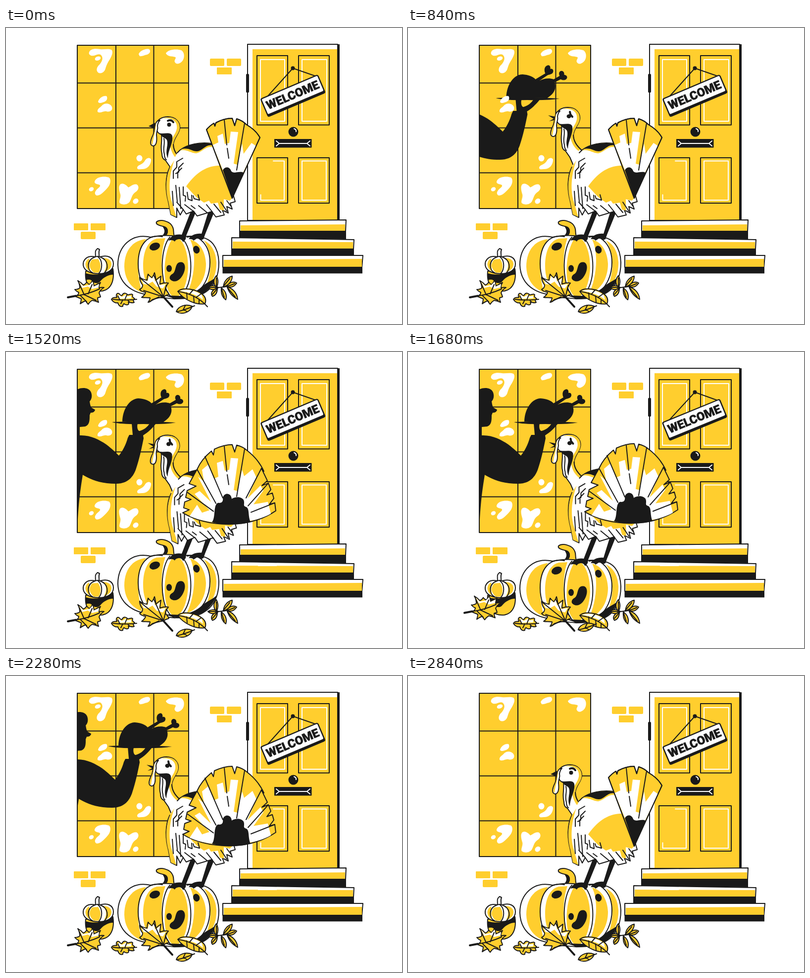
Write an HTML page that moves like this. It is 800x600 px and loops after 2880 ms.

```html
<!DOCTYPE html>
<html lang="en">
<head>
<meta charset="utf-8">
<title>Turkey at the door</title>
<style>
  html, body { margin: 0; width: 100%; height: 100%; overflow: hidden; background: #fff; }
  svg { display: block; width: 100vw; height: 100vh; }
  .k { fill: #1a1a1a; stroke: none; }
  .y { fill: #ffce2e; stroke: none; }
  .w { fill: #fff; stroke: none; }
  .yo { fill: #ffce2e; }
  .wo { fill: #fff; }
  .shine { stroke: #fff; }
  text { font: 900 24px Roboto, Inter, sans-serif; text-anchor: middle; fill: #1a1a1a; stroke-width: .6; }
</style>
</head>
<body>
<svg viewBox="0 0 800 600" fill="none" stroke="#1a1a1a" stroke-width="2" stroke-linejoin="round" stroke-linecap="round">
  <clipPath id="pane"><path d="M144 35H369V366H144Z"/></clipPath>

  <!-- window -->
  <path class="y" d="M144 35H369V366H144Z"/>
  <path d="M222 35V366M298.500 35V366M144 111.500H369M144 202.500H369M144 293.500H369"/>
  <g clip-path="url(#pane)">
    <g id="person" class="k">
      <path d="M130 75H146C152 72 168 71 172 82C175 91 172 97 169 100C170 107 171 111 173 113L180 117C179 122 175 123 171 123L169 128C169 138 169 148 160 151L149 152V169C170 168 189 178 202 187C215 197 222 204 228 210C236 200 242 188 246 174L249 168H256L254 145H266C264 152 266 160 270 160C278 158 286 152 290 145H303C296 154 287 163 277 169L278 175C274 195 270 215 262 239C255 257 243 267 222 267C190 267 170 258 155 249C152 270 146 300 144 366H130Z"/>
      <path d="M214 142Q278 139 343 143Q320 147 278 146Q230 147 214 142Z"/>
      <path d="M235 141C236 112 252 94 268 94C281 95 290 99 294 104L314 92C311 86 312 78 318 76C323 74 325 79 324 83C330 81 332 88 328 92C324 95 321 94 318 96L302 107C311 102 322 101 331 104L343 97C340 91 343 87 347 87C351 87 353 92 352 95C358 95 360 101 356 104C352 107 347 105 345 104L333 110C336 118 335 130 322 139L318 142Z"/>
    </g>
  </g>
  <g class="w">
    <path d="M168 49C170 43 178 41 190 43C198 44 206 41 213 44C217 48 214 56 210 63C204 72 203 76 201 82C199 90 192 93 187 91C181 87 183 79 189 74C194 68 198 60 191 54C185 51 179 58 172 56C168 54 167 52 168 49Z"/>
    <path d="M268 53C270 47 281 41 289 43C293 46 291 52 285 54C279 55 275 58 270 57Z"/>
    <path d="M323 51C328 43 345 42 354 45C361 49 361 60 357 66C352 73 344 75 341 69C339 65 345 61 342 59C338 57 326 59 323 51Z"/>
    <path d="M186 150C187 143 196 136 203 138C206 142 204 148 198 150C194 151 189 154 186 150Z"/>
    <path d="M185 170C184 163 190 162 194 157C199 151 211 152 214 160C216 167 210 171 203 169C197 167 191 174 185 170Z"/>
    <path d="M265 283C266 277 275 278 280 270C284 262 292 262 293 267C293 276 287 286 276 286C270 286 265 288 265 283Z"/>
    <path d="M180 309C184 301 200 300 208 303C213 307 211 318 205 324C199 331 189 342 182 339C177 335 181 329 186 325C191 321 192 318 186 317C181 316 177 314 180 309Z"/>
    <path d="M230 318C235 312 243 318 247 323C251 322 257 315 264 317C270 321 268 329 261 333C254 338 254 345 250 352C245 359 235 359 230 355C227 351 233 344 231 337C229 330 227 323 230 318Z"/>
    <ellipse cx="185.500" cy="62" rx="6" ry="4" transform="rotate(-20 185 62)"/>
    <ellipse cx="269.500" cy="264" rx="6" ry="6.500"/>
    <ellipse cx="172.500" cy="327" rx="5" ry="4" transform="rotate(-30 172 327)"/>
    <ellipse cx="262" cy="351" rx="6" ry="5" transform="rotate(-40 262 351)"/>
  </g>
  <path d="M144 35H369V366H144Z"/>

  <!-- bricks -->
  <g class="y">
    <rect x="412" y="62" width="29" height="15" rx="2"/><rect x="446" y="62" width="29" height="15" rx="2"/><rect x="426" y="80" width="30" height="14" rx="1"/>
    <rect x="137" y="396" width="29" height="14" rx="1"/><rect x="171" y="396" width="30" height="14" rx="1"/><rect x="151" y="413" width="30" height="15" rx="2"/>
  </g>

  <!-- door -->
  <path class="k" d="M668 33H674V390H668Z"/>
  <path class="wo" d="M488 33H670V390H488Z"/>
  <path class="y" d="M498 43H669V389H498Z"/>
  <rect class="k" x="485" y="93" width="6" height="38" rx="2"/>
  <path d="M507 56H569V196.500H507ZM591 56H653V196.500H591ZM507 263H569V355H507ZM591 263H653V355H591Z"/>
  <path class="shine" d="M514 64H563V189H514ZM598 64H648V189H598ZM540 269.500H562V349H514.500V338M598 269.500H647V349H598Z"/>
  <circle class="k" cx="580.500" cy="210.500" r="10"/>
  <path class="shine" d="M582 204Q587 206 586 210"/>
  <path class="k" d="M542 225H617.500V242.500H542Z"/>
  <path class="shine" d="M546 229L552 234H608L614 229M546 239L552 234M614 239L608 234"/>
  <path class="wo" d="M472 391L687 389L686 412H472Z"/>
  <path class="y" d="M474 400L685 398V412H474Z"/>
  <path class="k" d="M471 411H687V428L471 426Z"/>
  <path class="wo" d="M456 425L703 429L702 448H456Z"/>
  <path class="y" d="M458 433L701 434V448H458Z"/>
  <path class="k" d="M455 447H703V461H455Z"/>
  <path class="wo" d="M438 461H721L719 485H438Z"/>
  <path class="y" d="M440 470L719 468V485H440Z"/>
  <path class="k" d="M437.500 484H720V497.500H437.500Z"/>
  <g id="sign">
    <path d="M528 139L579.500 81.500L624 97"/>
    <circle class="k" cx="579.500" cy="81.500" r="4"/>
    <g transform="translate(579.500 137) rotate(-23)">
      <rect class="k" x="-63.500" y="-20" width="127" height="41" rx="4"/>
      <rect class="w" x="-61" y="-17.800" width="122" height="33" rx="2"/>
      <text x="0" y="7">WELCOME</text>
    </g>
  </g>

  <!-- small pumpkin -->
  <path class="yo" d="M161 493C158 524 174 535 195 533C215 529 219 508 216 488Z"/>
  <path class="k" d="M160 497C178 502 202 500 216 488V500C207 500 202 504 197 507C190 512 190 518 181 517C172 516 176 507 161 511Z"/>
  <path class="wo" d="M180 466C183 458 177 453 185 447L189 449C186 455 189 459 188 466Z"/>
  <path class="wo" d="M180 464C164 460 155 470 156 481C158 493 172 498 187 498C205 498 217 491 217 478C217 465 205 459 190 464Q185 462 180 464Z"/>
  <path class="y" d="M168 467C157 473 159 487 169 493ZM174 469C166 478 168 489 178 496L187 496C193 488 192 476 186 468ZM195 467C204 472 204 486 198 494C207 493 214 486 213 477C212 470 204 465 195 467Z"/>
  <path d="M180 464C163 470 162 490 176 497M190 464C207 470 208 488 198 497M186 464C196 472 195 490 187 498"/>

  <!-- big pumpkin with the feet on it -->
  <g id="pumpkin">
    <path class="yo" d="M304 393C312 387 332 391 337 404C340 411 337 417 341 424L320 423C329 415 328 404 317 402C309 400 302 398 304 393Z"/>
    <path class="k" d="M316 402C326 403 330 411 325 419L316 421C322 414 321 409 316 402Z"/>
    <path class="wo" d="M292 424C253 415 226 443 226 480C227 514 249 534 282 540C300 548 320 546 340 549C365 549 386 547 399 538C420 526 430 504 430 475C429 445 415 425 390 424C375 420 365 423 350 423C330 419 310 420 292 424Z"/>
    <path class="y" d="M283 428C252 431 239 455 239 484C240 510 253 528 275 536C264 500 262 455 283 428ZM304 427C285 432 277 455 277 482C277 510 287 532 307 543L326 544C313 510 310 460 322 426ZM334 430C320 455 316 500 326 528Q331 542 341 547C356 543 366 520 368 487C368 460 362 438 350 427ZM372 429C385 455 382 505 365 540C392 530 404 505 404 478C403 455 393 434 372 429ZM400 431C417 455 417 495 402 529C416 518 426 500 425 474C424 454 415 437 400 431Z"/>
    <path class="k" d="M322 542C345 553 375 550 399 538C412 529 422 514 427 502C417 513 405 515 395 525C386 533 372 541 350 543Z"/>
    <path d="M316 423C285 417 267 440 267 478C267 509 281 538 310 545M331 424C312 445 310 510 328 538Q333 546 341 549M352 423C369 436 375 465 373 494C371 519 361 542 346 548M366 424C393 417 412 443 412 475C412 505 398 530 378 541"/>
    <g class="k">
      <ellipse cx="300.500" cy="443" rx="11" ry="7.500" transform="rotate(-22 300.500 443)"/>
      <ellipse cx="384.500" cy="449.500" rx="6.500" ry="8" transform="rotate(-20 384 449)"/>
      <ellipse cx="329.500" cy="487.500" rx="5.500" ry="7"/>
      <path d="M350 475C360 472 364 482 360 494C356 506 347 516 337 513C328 510 329 502 337 498C344 493 341 478 350 475Z"/>
      <path d="M377 362L388 362L364 421L363 428L358 434Q354 427 349 428Q342 429 341 433Q337 428 328 431C333 421 343 417 355 419Z"/>
      <path d="M412 362L425 362L402 419L399 428L394 430Q390 426 385 427L379 431Q376 427 369 428C374 419 384 416 395 417Z"/>
    </g>
  </g>

  <g id="bird">
    <g id="head">
      <path class="wo" d="M340 302L331 281L322 268C317 266 315 261 315 255C311 241 316 232 314 216C307 214 303 207 303 198C304 186 314 180 327 180C342 180 352 190 351 203C350 215 339 222 338 236C338 248 345 258 354 266V300Z"/>
      <path class="y" d="M316 184C336 180 347 190 345 204C343 216 332 224 332 238C333 251 340 262 348 268L353 265C345 258 338 248 338 236C339 222 350 215 351 203C352 185 334 176 316 184Z"/>
      <path class="k" d="M311 213C318 216 333 209 336 219C338 234 327 248 327 264C320 250 329 238 325 227C322 222 315 223 311 213Z"/>
      <path d="M319 224C322 235 316 244 320 256Q320 264 324 267M338 236C338 248 345 258 354 266"/>
      <g id="calm">
        <path class="k" d="M288 199L301 192L304 205Z"/>
        <circle class="k" cx="329.500" cy="196" r="4"/>
        <path d="M327 188Q334 185 338 191" stroke-width="4"/>
      </g>
      <g id="alarm">
        <path class="k" d="M287 196L303 199V205L289 208L298 203Z"/>
        <ellipse class="k" cx="329" cy="198" rx="4.500" ry="4"/>
        <path d="M331 189L332 194L336 199" stroke-width="4"/>
      </g>
      <path class="wo" d="M311 187C299 187 302 205 297 217C291 229 290 238 297 239C305 239 305 226 304 217C304 207 308 207 306 198Q307 191 311 187Z"/>
      <path class="y" d="M303 192C300 203 301 211 297 219C293 229 292 235 296 237C297 224 303 210 303 192Z"/>
    </g>
    <path class="wo" d="M346 253L352 247C368 235 392 231 416 234L459 338L463 352L453 355L457 367L446 362L449 375L437 369L441 379L424 383L416 372L406 375L386 381L379 371L364 377L358 368L352 379L345 365V384L333 378L328 352C322 330 321 302 331 282"/>
    <path class="y" d="M340 268C329 300 328 330 335 352L344 383L333 378L328 352C322 330 322 302 332 281Z"/>
    <path class="y" d="M351 249C363 244 371 253 384 254C397 252 402 239 419 241L416 234C392 231 368 235 351 249Z"/>
    <path class="k" d="M353 246C368 235 392 231 416 234L417 238C403 235 398 249 386 250C374 250 370 241 353 246Z"/>
    <path class="y" d="M364 321C380 298 403 278 432 279L459 343L452 350L440 347V370L432 368L428 354L414 356L410 350L400 354L390 347C381 341 374 331 364 321Z"/>
    <path d="M357 264L345 271V282L338 290V305M358 274L349 283V292L343 295M355 284L347 292V304M336 331L338 360M343 319L346 352M350 323L353 366M358 322V339L363 341L362 351M366 333L368 347L376 350L375 339M378 340L380 346L391 349L388 338M345 353L358 368M361 358L378 371M374 360L382 366M389 360L406 374M405 358L417 373M420 357L434 374M434 353L446 371M446 350L455 362"/>
  </g>
  <g id="tail">
    <g id="closed">
      <path class="yo" d="M457 345L405 206C410 200 415 196 420 193L422 199L424 192C435 186 447 183 457 183L462 198L466 184C476 187 482 192 486 196C498 203 508 213 513 222Z"/>
      <path class="w" d="M415 231L418 237L429 232L427 219L438 214L442 235L451 233L454 210L469 211L460 275L467 277L477 234L480 255L496 233L505 239L479 293L457 297L438 288Z"/>
      <path class="k" d="M438 288C443 280 452 281 455 290C460 297 470 289 480 293L457 345Z"/>
      <path d="M441 187L446 237M447 244L450 264M482 193L466 288M457 345L405 206C410 200 415 196 420 193L422 199L424 192C435 186 447 183 457 183L462 198L466 184C476 187 482 192 486 196C498 203 508 213 513 222Z"/>
    </g>
    <g id="fan">
      <path class="yo" d="M357 321C385 338 415 344 450 344.500C490 344 520 334 545 317L543 301L532 304L541 292L538 281L527 285L535 274L530 261L517 266L528 256L516 231L521 237C513 219 499 204 486 194Q478 187 466 184L462 198L457 183C444 183 432 187 421 192L419 204L415 196C403 206 393 217 386 233L370 262L384 267L366 276L363 290L374 294L361 299L359 311L370 315Z"/>
      <path class="w" d="M371 328L386 305L396 321L411 316L381 283L391 277L414 299L388 248L400 258L396 234L409 223L420 252L429 248L426 220L438 216L442 236L451 234L454 210L469 211L460 275L467 277L477 234L481 247L498 233L506 250L488 292L514 266L520 276L500 304L529 299L535 323C500 344 420 350 371 328Z"/>
      <path class="k" d="M416 340C424 332 418 306 428 301C437 302 439 298 438 290C442 279 455 281 456 293C462 289 474 287 480 295C483 302 478 307 484 309C493 311 488 326 494 340C475 346 435 346 416 340Z"/>
      <path d="M441 187L446 237M447 244L450 264M482 192L466 288M386 233L424 302M402 207L438 291M516 231L485 291M530 261L489 307M367 280L419 318M543 301L495 320"/>
    </g>
  </g>

  <!-- fallen leaves -->
  <g id="maple">
    <path class="yo" d="M140 544Q147 541 147 536Q142 534 139 530Q145 530 149 527Q149 519 145 512Q152 516 156 521Q160 520 163 515Q166 519 169 520Q173 516 175 511Q177 517 178 523Q184 519 191 516Q187 522 188 527Q193 525 198 526Q190 531 188 537Q190 541 191 545L185 547Q185 552 187 556Q180 553 174 552Q169 555 166 560Q163 557 161 553Q155 555 150 559Q152 553 152 549Z"/>
    <path class="w" d="M148 515L156 523L168 521L175 514L177 524L188 519L187 526L174 529L165 524L154 527Z"/>
    <path d="M125 546L141 543" stroke-width="4"/>
    <path d="M141 543Q165 540 189 529M158 541L148 518M166 539L174 520M159 541L182 552M151 543L163 555"/>
  </g>
  <g>
    <path class="yo" d="M318 545C308 547 300 549 295 551C293 554 290 556 287 556C290 552 291 549 291 547C285 546 279 547 274 546C278 543 281 540 282 536C277 535 272 533 270 530C274 528 276 525 276 521C273 517 270 511 270 505C275 509 280 511 285 511C285 507 286 502 287 499C290 502 292 505 295 506C297 503 299 499 300 496C302 502 302 507 303 511C306 508 310 505 313 503C312 509 311 514 311 519C317 517 323 516 328 517C325 521 322 526 322 530C325 533 328 537 329 540C325 541 321 543 318 545Z"/>
    <path class="w" d="M273 509L286 513L289 503L295 508L299 501L301 514L311 507L309 521L323 519L317 528L304 524L296 514L286 520L278 519Z"/>
    <path d="M272 508L318 545L299 502M318 545L324 521M318 545L278 532M309 545L291 554"/>
    <path d="M318 545L336 565" stroke-width="4"/>
  </g>
  <g>
    <path class="yo" d="M213 550C216 545 220 547 224 546C221 541 225 535 229 539C232 543 234 543 235 541C238 535 244 538 246 541C251 540 255 538 256 541C254 545 257 546 260 549C257 551 256 553 259 556C255 559 251 555 247 556C250 560 245 563 240 560C238 558 236 560 236 564C231 566 227 562 226 557C222 558 216 556 213 550Z"/>
    <path class="w" d="M226 546L227 540L234 545L243 540L244 544L253 543L253 548L228 549Z"/>
    <path d="M216 550Q240 553 264 550M230 551L226 543M240 551L244 541M236 551L232 559M246 552L250 556"/>
  </g>
  <g>
    <path class="yo" d="M347 534C358 524 386 530 397 540C405 547 404 554 402 559C385 562 360 552 347 534Z"/>
    <path class="w" d="M351 533C363 527 385 532 396 542L398 551C385 540 367 535 351 533Z"/>
    <path d="M348 534Q385 540 407 565M365 537L366 549M379 543L380 556M390 550V559M371 539L378 531M384 546L394 539"/>
  </g>
  <g id="smallLeaf">
    <path class="yo" d="M344 575C348 563 364 559 376 564C373 575 357 583 344 575Z"/>
    <path d="M346 575Q363 571 381 563M358 571L362 563M359 571L366 575"/>
  </g>
  <g>
    <path class="yo" d="M425 526C417 517 420 507 425 502C429 510 429 519 425 526ZM439 525C440 512 449 505 457 503C457 514 449 522 439 525ZM429 526C420 520 412 523 408 526C414 532 422 531 429 526ZM446 524C451 515 460 513 466 517C461 525 454 527 446 524ZM427 527C415 531 413 539 417 544C424 542 427 535 427 527ZM435 527C434 537 437 546 444 551C447 541 443 532 435 527ZM447 525C450 536 459 545 468 550C467 538 459 528 447 525Z"/>
    <path d="M408 526H430Q448 525 462 518M425 507V526M452 508L438 525M417 540L428 527M441 546L435 527M463 545L447 526"/>
  </g>
</svg>
<script>
const LOOP = 2880, STEP = 40;
const $ = id => document.getElementById(id);
const clamp = u => Math.max(0, Math.min(1, u));
const move = (id, x, y) => $(id).setAttribute('transform', `translate(${x} ${y})`);
const show = (id, on) => $(id).style.display = on ? '' : 'none';

// Eased value through [time, value] keys.
function track(t, ...keys) {
  if (t <= keys[0][0]) return keys[0][1];
  for (let i = 1; i < keys.length; i++) {
    const [t0, a] = keys[i - 1], [t1, b] = keys[i];
    if (t < t1) {
      const u = (t - t0) / (t1 - t0);
      return a + (b - a) * u * u * (3 - 2 * u);
    }
  }
  return keys[keys.length - 1][1];
}

function draw(t) {
  const enter = (1 - clamp((t - 120) / 1160)) ** 1.85;
  const leave = clamp((t - 2240) / 320) ** 1.6;
  move('person', -220 * (enter + leave), 0);

  // The bird leaps, carrying the pumpkin in its claws.
  const u = clamp((t - 1255) / 270);
  const hop = -140 * 4 * u * (1 - u);
  const crouch = track(t, [1200, 0], [1260, 8], [1340, 0], [1440, 0], [1520, 15], [1580, 14], [1720, 0]);
  move('pumpkin', 0, hop);
  move('bird', crouch / 6, hop + crouch);
  move('tail', 0, hop + crouch);

  const headX = track(t, [120, 0], [560, -6], [740, -6], [900, -3], [2480, -3], [2760, 0]);
  const headY = track(t, [640, 0], [840, -19], [1200, -18], [1600, -16], [2480, -16], [2760, 0]);
  move('head', headX, headY);
  const alarmed = t >= 760 && t < 2620;
  show('alarm', alarmed);
  show('calm', !alarmed);

  const open = track(t, [1240, 0], [1440, 1], [2480, 1], [2720, 0]);
  show('fan', open > 0);
  show('closed', open === 0);
  $('fan').setAttribute('transform', `translate(458 0) scale(${0.55 + 0.45 * open} 1) translate(-458 0)`);

  // The landing shakes the sign and the loose leaves.
  const swing = track(t, [1540, 0], [1620, -5], [1730, 5], [1830, -3], [1920, 1.8], [2020, -1], [2140, 0]);
  $('sign').setAttribute('transform', `rotate(${swing} 579.5 81.5)`);
  move('maple', track(t, [1540, 0], [1680, -11], [1920, 13], [2140, 0]),
                track(t, [1540, 0], [1700, -18], [1920, -8], [2140, 0]));
  move('smallLeaf', track(t, [1540, 0], [1920, -1], [2100, 0]),
                    track(t, [1540, 0], [1680, -12], [1920, -3], [2100, 0]));
}

function frame() {
  const t = performance.now() % LOOP;
  draw(t < 120 ? 0 : Math.floor(t / STEP + 0.01) * STEP);
  requestAnimationFrame(frame);
}
frame();
</script>
</body>
</html>
```
